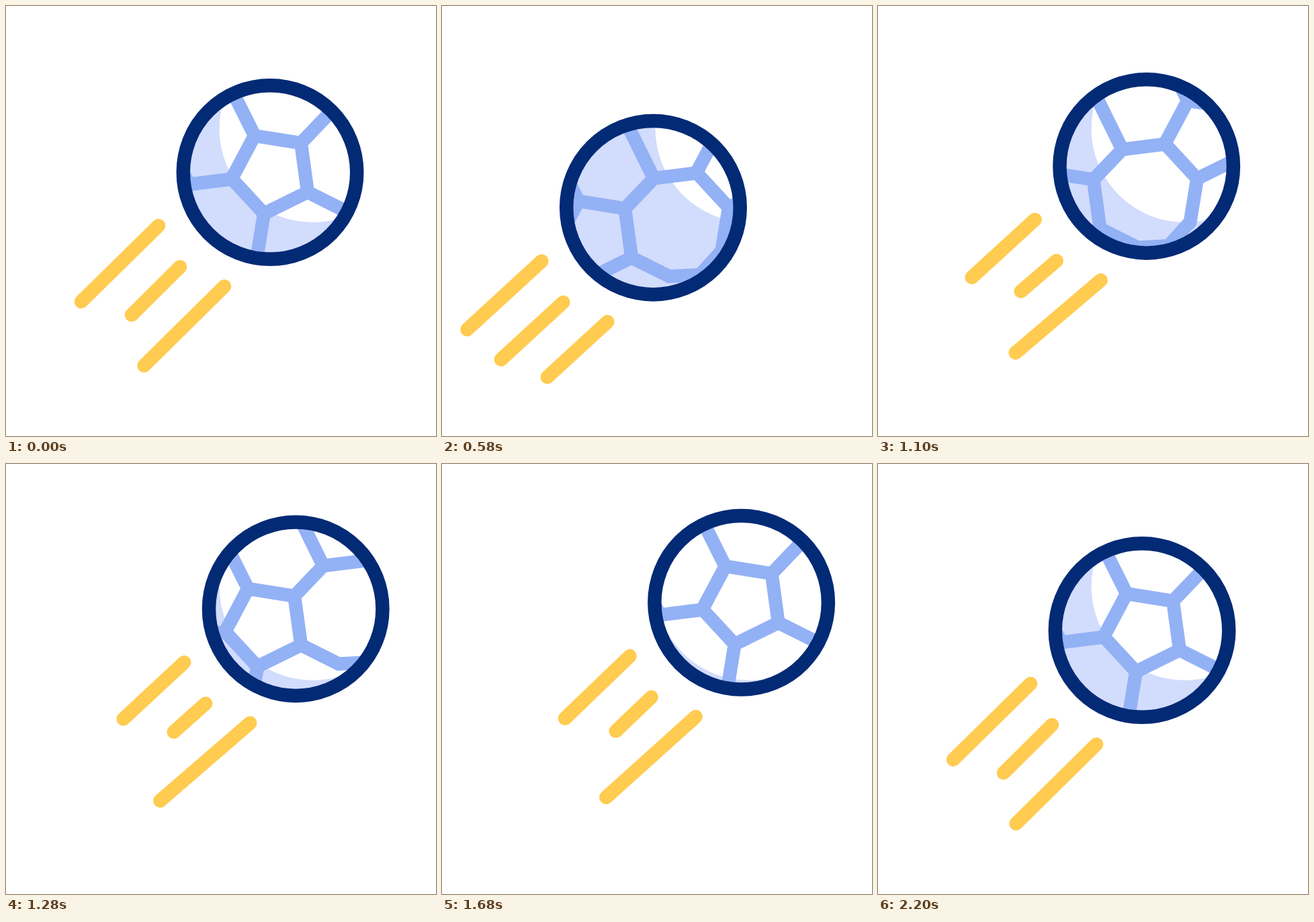
These frames come from a looping animation (640x640 px, 2.4 s). An HTML page with a canvas:

```html
<!DOCTYPE html>
<html>
<head>
<meta charset="utf-8">
<style>
  html, body { margin: 0; width: 100%; height: 100%; overflow: hidden; background: #fff; }
  canvas { display: block; width: 640px; height: 640px; }
</style>
</head>
<body>
<canvas id="stage" width="640" height="640"></canvas>
<script>
const ctx = document.getElementById('stage').getContext('2d');
const LOOP = 2400, MOVE = 2200;
const NAVY = '#032a75', BLUE = '#93b1f5', SHADE = '#d2dcfd', YELLOW = '#ffcb50';

const times = [0, 360, 505, 800, 1100, 1480, 1540, 1620, 1880, MOVE];

// Smooth monotone curve through the values at the shared times, at rest at both ends.
function track(...values) {
  const span = i => times[i + 1] - times[i];
  const slope = i => (values[i + 1] - values[i]) / span(i);
  const tangents = values.map((_, i) => {
    if (i === 0 || i === values.length - 1) return 0;
    const a = slope(i - 1), b = slope(i);
    if (a * b <= 0) return 0;
    const wa = 2 * span(i) + span(i - 1), wb = span(i) + 2 * span(i - 1);
    return (wa + wb) / (wa / a + wb / b);
  });
  return t => {
    let i = 0;
    while (i < times.length - 2 && t >= times[i + 1]) i++;
    const h = span(i), u = (t - times[i]) / h, v = 1 - u;
    return v * v * ((1 + 2 * u) * values[i] + u * h * tangents[i])
         + u * u * ((3 - 2 * u) * values[i + 1] - v * h * tangents[i + 1]);
  };
}

const ballX = track(0, -62, -82, -49, 6.5, 61.5, 63.3, 58.3, 29, 0);
const ballY = track(0, 43.5, 55, 32, -9, -48.5, -49.8, -45.8, -22.5, 0);
const roll = track(0, -71, -94, -35.5, 84, 222.5, 228, 220, 145.5, 0);

// Speed lines: a head that follows the ball and a tail relative to it.
const trails = [
  { x: 227, y: 327,
    dx: track(-115, -113, -112.3, -103.5, -94, -88, -87.5, -92, -111, -115),
    dy: track(113, 106, 104, 93, 86, 83.5, 83.5, 88, 109, 113) },
  { x: 259, y: 388.3,
    dx: track(-72, -94.5, -95.5, -71.5, -53, -44, -43.5, -48, -68.5, -72),
    dy: track(71.5, 88, 88.5, 62.5, 45.5, 41, 41, 45.5, 67, 71.5) },
  { x: 325, y: 417.3,
    dx: track(-119.5, -91.5, -87, -108.5, -127, -138.5, -139, -136.5, -122, -119.5),
    dy: track(118, 87, 81, 93, 108, 121.5, 122, 121, 118, 118) }
];

// One cell of the ball pattern, repeated every (stepX, stepY).
const stepX = 209.5, stepY = -106.5;
const cell = new Path2D(
  'M370 193L439 204L449 277L384 309L336 257Z' +
  'M370 193L335 123M439 204L482 159L546 151M482 159L445 84' +
  'M449 277L505 305L551 302.5L583 267L593.5 202.5');

function disc(x, y, r) {
  ctx.beginPath();
  ctx.arc(x, y, r, 0, 2 * Math.PI);
}

function draw(t) {
  ctx.fillStyle = '#fff';
  ctx.fillRect(0, 0, 640, 640);
  const bx = ballX(t), by = ballY(t), cx = 393 + bx, cy = 247.5 + by;

  ctx.lineWidth = 20.5;
  ctx.lineCap = 'round';
  ctx.strokeStyle = YELLOW;
  for (const { x, y, dx, dy } of trails) {
    ctx.beginPath();
    ctx.moveTo(x + bx, y + by);
    ctx.lineTo(x + bx + dx(t), y + by + dy(t));
    ctx.stroke();
  }

  ctx.save();
  disc(cx, cy, 129);
  ctx.clip();
  ctx.fillStyle = SHADE;
  ctx.fillRect(0, 0, 640, 640);
  // The highlight stays still while the ball moves through it.
  ctx.fillStyle = '#fff';
  disc(457, 182.5, 139.5);
  ctx.fill();
  const shift = roll(t);
  ctx.translate(bx + shift, by + shift * stepY / stepX);
  ctx.lineWidth = 20;
  ctx.lineCap = 'butt';
  ctx.strokeStyle = BLUE;
  ctx.translate(-3 * stepX, -3 * stepY);
  for (let i = 0; i < 6; i++) {
    ctx.stroke(cell);
    ctx.translate(stepX, stepY);
  }
  ctx.restore();

  ctx.lineWidth = 20.5;
  ctx.strokeStyle = NAVY;
  disc(cx, cy, 129.25);
  ctx.stroke();
}

function frame() {
  draw(Math.min(performance.now() % LOOP, MOVE));
  requestAnimationFrame(frame);
}
frame();
</script>
</body>
</html>
```
